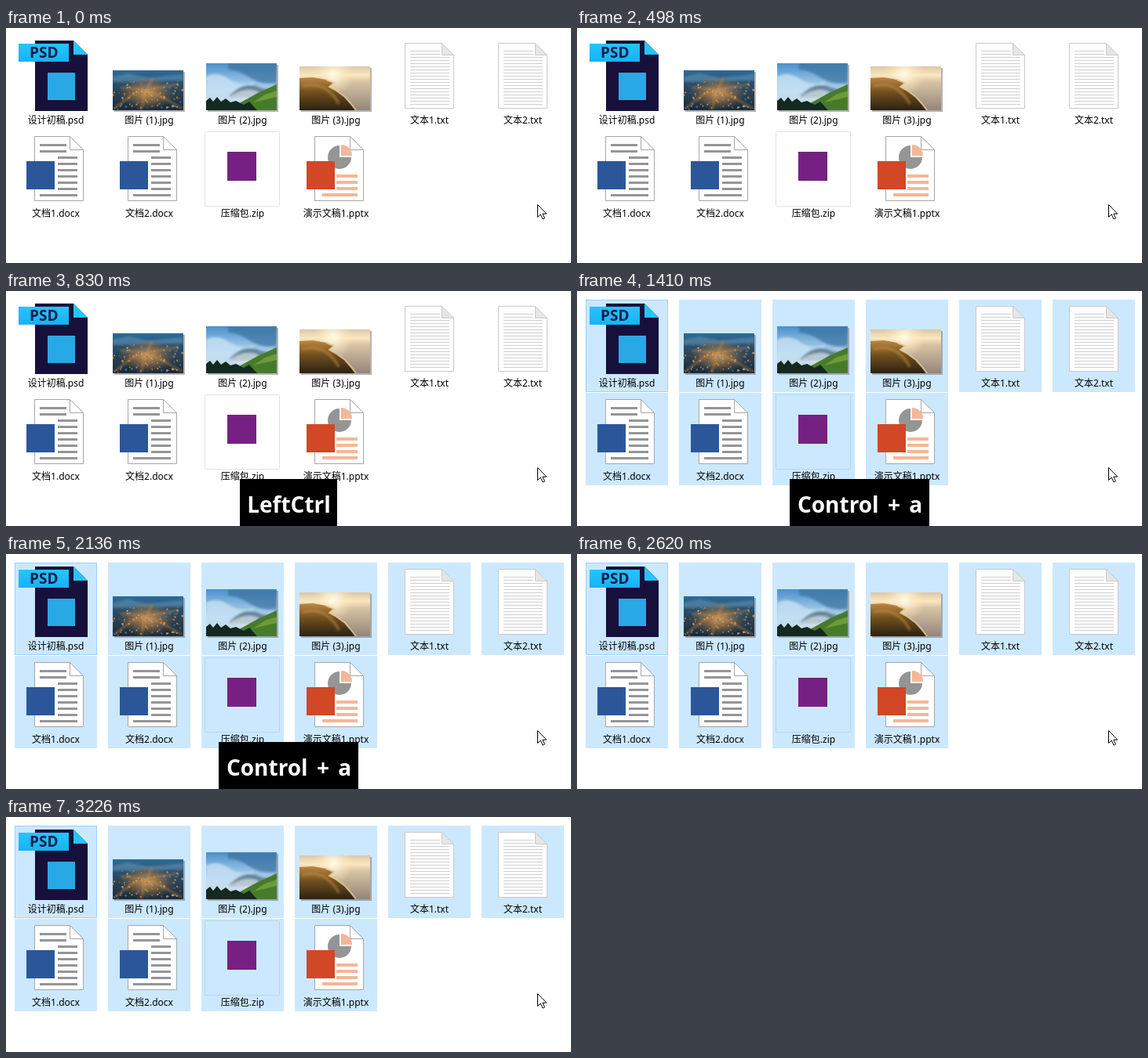
An HTML page that plays this animation: 720x300 px, repeating every 3630 ms.

```html
<!DOCTYPE html>
<html lang="zh-CN">
<head>
<meta charset="utf-8">
<style>
  html, body { margin: 0; width: 100%; height: 100%; overflow: hidden; background: #fff; }
  svg { display: block; }
  #stage { width: 720px; height: 300px; }
  .label { font: 12px "Noto Sans", "Noto Sans CJK SC", "Noto Sans CJK", sans-serif; text-anchor: middle; fill: #000; }
  .key { font: bold 28px "Open Sans", "Noto Sans", sans-serif; text-anchor: middle; fill: #fff; word-spacing: 4px; }
  .tag { font: bold 19px "Open Sans", "Noto Sans", sans-serif; fill: #10204c; }
</style>
</head>
<body>
<svg id="stage" viewBox="0 0 720 300">
  <defs>
    <linearGradient id="tagFill" x2="0" y2="1">
      <stop stop-color="#27c4fb"/><stop offset="1" stop-color="#18b2f4"/>
    </linearGradient>
    <linearGradient id="citySky" x2="0" y2="1">
      <stop stop-color="#2c6c9c"/><stop offset=".3" stop-color="#2a4f6c"/>
      <stop offset=".6" stop-color="#2b4050"/><stop offset="1" stop-color="#172a3a"/>
    </linearGradient>
    <linearGradient id="hillSky" x2="0" y2="1">
      <stop stop-color="#4a90cc"/><stop offset=".35" stop-color="#8dbbe0"/><stop offset=".7" stop-color="#c4dced"/>
    </linearGradient>
    <linearGradient id="coastSky" x2="0" y2="1">
      <stop stop-color="#d9c7ab"/><stop offset=".2" stop-color="#fbe7bd"/>
      <stop offset=".35" stop-color="#d8c3a4"/><stop offset="1" stop-color="#94857a"/>
    </linearGradient>
    <linearGradient id="coastLand" x2="0" y2="1">
      <stop stop-color="#bd8742"/><stop offset=".45" stop-color="#70501f"/><stop offset="1" stop-color="#2b2112"/>
    </linearGradient>
    <radialGradient id="sun">
      <stop stop-color="#fffbe8"/><stop offset="1" stop-color="#ffe4ac" stop-opacity="0"/>
    </radialGradient>
    <radialGradient id="cityGlow">
      <stop stop-color="#d69b55"/><stop offset="1" stop-color="#a06a35" stop-opacity="0"/>
    </radialGradient>
    <filter id="soft"><feGaussianBlur stdDeviation="1.5"/></filter>
  </defs>
  <g id="cells"></g>
  <rect id="hoverBox" x="253.5" y="132.5" width="95" height="95" rx="1"/>
  <g id="icons"></g>
  <g id="overlay">
    <rect id="keyBox" y="240" height="60"/>
    <text id="keyText" class="key" x="360.5" y="283"></text>
  </g>
  <path d="M677.5 225.5V241.5L681.2 238L684 244L686.5 242.8L683.8 237.2H688.8Z" fill="#fff" stroke="#000"/>
</svg>
<script>
const LOOP = 3630, KEY_DOWN = 830, SELECT = 1410, KEY_UP = 2620;
const $ = id => document.getElementById(id);
const rect = (x, y, w, h, fill, extra = '') =>
  `<rect x="${x}" y="${y}" width="${w}" height="${h}" fill="${fill}" ${extra}/>`;
const path = (d, fill, extra = '') => `<path d="${d}" fill="${fill}" ${extra}/>`;
const circle = (x, y, r, fill, extra = '') => `<circle cx="${x}" cy="${y}" r="${r}" fill="${fill}" ${extra}/>`;

// Icons are drawn relative to the top left corner of their 105 x 118 cell.
const page = (x, y, w, h, fold, stroke, corner) =>
  path(`M${x} ${y}h${w - fold}l${fold} ${fold}v${h - fold}h${-w}z`, '#fff', `stroke="${stroke}"`) +
  path(`M${x + w - fold} ${y}v${fold}h${fold}z`, corner, `stroke="${stroke}"`);

function psd() {
  return path('M26 5h49l18 18v72h-67z', '#16103a') +
    path('M75 5v18h18z', '#27c4fb') +
    rect(5, 9, 64, 23, 'url(#tagFill)') +
    '<text class="tag" x="19" y="27">PSD</text>' +
    rect(42, 46, 35, 35, '#29a8e6');
}

function txt() {
  let s = page(21.5, 8.5, 62, 83, 15, '#c9c9c9', '#e6e6e6');
  for (let y = 18; y < 87; y += 4) s += rect(28, y, y < 25 ? 38 : 50, 1, '#cfcfcf');
  return s;
}

function docx() {
  let s = page(25.5, 8.5, 62, 82, 17, '#a6a6a6', '#fff');
  for (let i = 0; i < 9; i++) {
    const x = i > 1 && i < 8 ? 55 : 32;
    s += rect(x, 18 + i * 8, (i > 1 ? 80 : 66) - x, 3, '#959595');
  }
  return s + rect(15, 40, 36, 36, '#2b579a');
}

function pptx() {
  let s = page(25.5, 8.5, 62, 82, 17, '#a6a6a6', '#fff') +
    path('M57 35V20A15 15 0 1 0 72 35Z', '#959595') +
    path('M59 33V19A14 14 0 0 1 73 33Z', '#f4b798');
  for (let i = 0; i < 4; i++) {
    const x = i < 3 ? 53 : 35;
    s += rect(x, 57 + i * 8, 80 - x, 4, '#f4b798');
  }
  return s + rect(15, 40, 36, 36, '#d24726');
}

const zip = () => rect(33, 28, 37, 37, '#762083');

const photo = (h, art) =>
  rect(8, 96 - h, 90, h, '#777', 'opacity=".55"') +
  `<svg x="6" y="${94 - h}" width="90" height="${h}">${art}</svg>`;

function city() {
  let seed = 7, lights = '';
  const rnd = () => (seed = seed * 16807 % 2147483647) / 2147483647;
  for (let i = 0; i < 110; i++) {
    const y = 14 + rnd() * 36;
    lights += circle((rnd() * 90).toFixed(1), y.toFixed(1), (.4 + rnd()).toFixed(1),
      ['#d9944a', '#e5b36f', '#4d7f9f'][i % 3], 'opacity=".7"');
  }
  return photo(51, rect(0, 0, 90, 51, 'url(#citySky)') +
    path('M0 8L20 4L45 9L90 5V13L0 15Z', '#6c9cbf', 'opacity=".5" filter="url(#soft)"') +
    '<ellipse cx="44" cy="29" rx="36" ry="22" fill="url(#cityGlow)"/>' +
    path('M3 48L25 31L43 25L62 34L89 49M42 25L36 51M43 25L50 11M10 22L43 25L82 18', 'none',
      'stroke="#d58e45" stroke-width="2" opacity=".6" filter="url(#soft)"') + lights);
}

const hills = () => photo(60, rect(0, 0, 90, 60, 'url(#hillSky)') +
  '<g filter="url(#soft)">' +
  path('M28 0H90V25Q70 28 55 18T28 8Z', '#396f9e', 'opacity=".7"') +
  path('M0 17Q14 10 29 20T60 24V40H0Z', '#c6e1f5', 'opacity=".8"') +
  path('M30 41Q48 22 66 30T90 25V44H30Z', '#65859b') +
  path('M28 44Q50 28 68 37L55 48Z', '#dce6e8', 'opacity=".7"') + '</g>' +
  path('M44 50L66 38L90 27V60H34Z', '#477b2c') +
  path('M60 50L75 40L90 35V43Z', '#6d9c37') +
  path('M0 48L5 44L9 49L14 43L19 49L25 45L31 50L38 48L48 53L55 49L65 60H0Z', '#14291f'));

const coast = () => photo(56, rect(0, 0, 90, 56, 'url(#coastSky)') +
  circle(43, 10, 27, 'url(#sun)') +
  path('M0 15L17 14L34 17L44 21L38 26L47 31L58 39L65 47L72 56H0Z', 'url(#coastLand)') +
  path('M34 17L44 21L38 26L47 31L58 39L65 47L72 56', 'none', 'stroke="#edcf9c" stroke-width="2" opacity=".8"') +
  path('M4 25Q23 21 34 29T50 48', 'none', 'stroke="#c78f42" stroke-width="3" opacity=".6" filter="url(#soft)"'));

const files = [
  ['设计初稿.psd', psd], ['图片 (1).jpg', city], ['图片 (2).jpg', hills],
  ['图片 (3).jpg', coast], ['文本1.txt', txt], ['文本2.txt', txt],
  ['文档1.docx', docx], ['文档2.docx', docx], ['压缩包.zip', zip], ['演示文稿1.pptx', pptx]
];

files.forEach(([name, draw], i) => {
  const x = 11 + i % 6 * 119, y = i < 6 ? 11 : 130;
  $('cells').innerHTML += rect(x, y, 105, 118, '#cce8ff') +
    (i ? '' : rect(x + .5, y + .5, 104, 117, 'none', 'stroke="#99d1ff"'));
  $('icons').innerHTML += `<g transform="translate(${x} ${y})">${draw()}</g>` +
    `<text class="label" x="${x + 52.5}" y="${y + 111}">${name}</text>`;
});

function render(t) {
  const selected = t >= SELECT;
  $('cells').style.display = selected ? '' : 'none';
  $('hoverBox').setAttribute('fill', selected ? 'none' : '#fff');
  $('hoverBox').setAttribute('stroke', selected ? '#b2d7f2' : '#e2e2e2');
  $('overlay').style.display = t >= KEY_DOWN && t < KEY_UP ? '' : 'none';
  const width = selected ? 178 : 124;
  $('keyBox').setAttribute('x', 360 - width / 2);
  $('keyBox').setAttribute('width', width);
  $('keyText').textContent = selected ? 'Control + a' : 'LeftCtrl';
}

const start = performance.now();
function tick() {
  render((performance.now() - start) % LOOP);
  requestAnimationFrame(tick);
}
tick();
</script>
</body>
</html>
```
